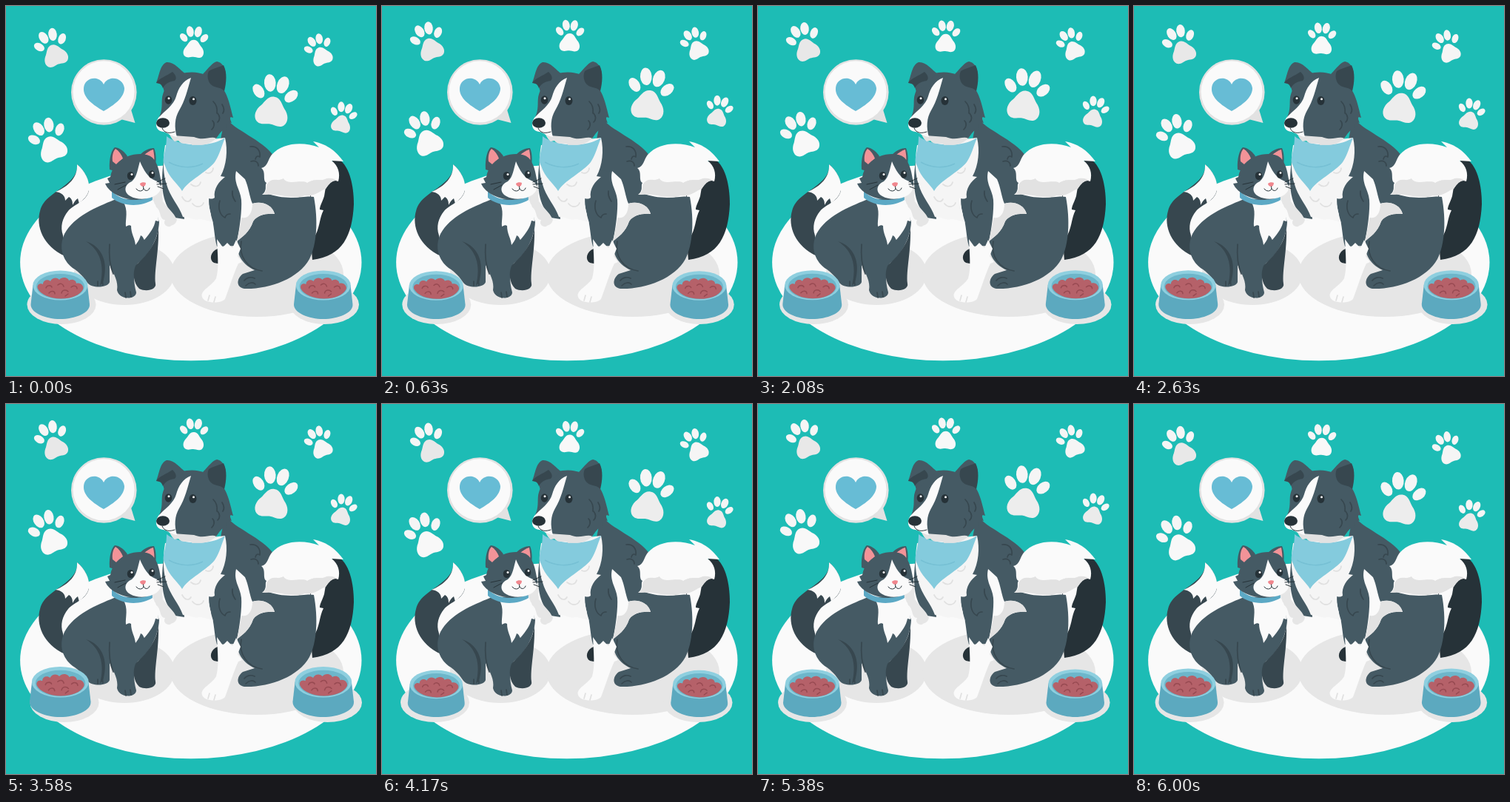
Recreate the animation shown at these times as an HTML page. Size 500 px wide and 500 px high, loop 6.04 s.

```html
<!DOCTYPE html>
<html lang="en">
<head>
<meta charset="utf-8">
<title>Cat and dog</title>
<style>
html, body { margin: 0; width: 100%; height: 100%; overflow: hidden; background: #1dbcb5; }
svg { display: block; width: 100%; height: 100%; }
.fur { fill: #455a64; }
.deep { fill: #37474f; }
.ink { fill: #263238; }
.white { fill: #fafafa; }
.soft { fill: #f5f5f5; }
.grey { fill: #e2e2e2; }
.shadow { fill: #e6e6e6; }
.line { fill: none; stroke: #37474f; stroke-width: 1.7; stroke-linecap: round; stroke-linejoin: round; }
.thin { stroke: #263238; stroke-width: 1; }
.pale { stroke: #e0e0e0; }
</style>
</head>
<body>
<svg viewBox="0 0 500 500">
<defs>
  <path id="pad" d="M0-21C9-21 12-12 16-7C23 0 25 10 19 16C13 21 6 17 0 17C-6 17-13 21-19 16C-25 10-23 0-16-7C-12-12-9-21 0-21Z"/>
  <g id="toes">
    <ellipse cy="-34" rx="7" ry="10.500" transform="rotate(-42)"/>
    <ellipse cy="-40" rx="8" ry="12" transform="rotate(-13)"/>
    <ellipse cy="-40" rx="8" ry="12" transform="rotate(13)"/>
    <ellipse cy="-34" rx="7" ry="10.500" transform="rotate(42)"/>
  </g>
  <g id="bowl">
    <path fill="#5ca9bf" d="M36.5 377L33.5 403C33 415 54 423 73 423C93 423 114 415 113 403L110 377Z"/>
    <ellipse cx="73.3" cy="377.500" rx="37" ry="20" fill="#8ecfdf"/>
    <ellipse cx="73.5" cy="379" rx="32.500" ry="17" fill="#6db6ca"/>
    <path fill="#b56169" d="M43 382C41 377 46 374 50 376C50 370 57 369 60 372C63 366 70 367 72 370C76 365 84 367 85 371C90 368 95 371 95 375C101 373 106 379 104 383C100 391 88 395.500 74 395.500C60 395.500 47 390 43 382Z"/>
    <path fill="none" stroke="#984a52" stroke-width="1.500" stroke-linecap="round" d="M54 381C55 377 61 377 62 380M70 377C73 374 77 375 78 379M58 388C61 384 66 385 66 389M75 388C76 383 82 383 84 386M88 380C91 377 96 378 96 382M80 392L84 389"/>
  </g>
</defs>

<ellipse cx="249.800" cy="346.500" rx="230.700" ry="132.700" class="white"/>
<ellipse cx="160" cy="361" rx="68" ry="43" class="shadow"/>
<ellipse cx="339" cy="362" rx="117" ry="58" class="shadow"/>

<!-- speech bubble -->
<path class="grey" d="M168 137L174.500 158L147 151Z"/>
<circle cx="132.300" cy="116.500" r="44.300" class="grey"/>
<circle cx="132" cy="115.800" r="41.500" class="white"/>
<path fill="#67bcd5" d="M132 142C118 134 104 124 105 111C106 96 126 93 132 106C138 93 158 96 160 111C160 124 146 134 132 142Z"/>

<g id="paws"></g>

<!-- dog: tail -->
<path class="ink" d="M446 205C464 213 470 242 470 268C468 310 455 338 414 343C411 310 410 280 412 235Z"/>
<path class="white" d="M411 245L432 245L430 257C428 264 424 270 424 275L429 276C423 288 424 302 416 313Z"/>

<!-- dog: body -->
<path class="fur" d="M296 150C308 168 346 180 362 203L350 252C380 265 405 255 416 258C422 290 420 322 410 342C395 369 355 383 322 382C311 380 311 369 320 362L336 357C317 348 309 332 314 312L276 290L290 180Z"/>
<path class="line" d="M330 190C340 189 344 196 343 204M343 204C340 202 338 203 337 207M331 210C337 208 341 211 341 216M318 318C314 338 326 355 346 358M322 371C326 366 332 366 336 368M324 378C329 373 334 373 337 376"/>
<path class="white" d="M359 201C374 184 402 183 423 191L415 183C436 187 447 198 456 210L440 209C449 216 452 226 449 237C443 234 438 238 432 247C425 249 418 258 404 256C388 263 370 252 346 255C354 249 349 243 352 239C346 236 352 224 345 219C354 217 354 207 359 201Z"/>
<path class="grey" d="M347 255C355 249 350 243 354 239C362 231 366 238 375 233C380 243 400 234 407 239C418 232 424 237 431 234C435 232 444 232 449 237C443 234 438 238 432 247C425 249 418 258 404 256C388 263 370 252 347 255Z"/>

<!-- dog: far leg and raised paw -->
<path class="ink" d="M286 328C276 332 274 343 281 347L296 350Z"/>
<path class="fur" d="M213 210C208 246 212 268 228 286L241 288L236 250Z"/>
<path fill="#e6e6e6" d="M209 233C213 241 210 252 212 264C219 274 226 278 231 289C229 297 224 295 222 298C216 299 212 294 215 289C207 289 210 276 203 272C202 266 196 265 196 260Z"/>

<!-- dog: chest and near leg -->
<path class="fur" d="M296 222C276 235 270 256 277 282C282 298 281 310 285 325L311 324C316 302 319 275 318 258L310 224Z"/>
<path class="white" d="M311 223L323 234C328 245 329 258 333 267C345 263 360 268 363 281C352 280 340 282 334 291C329 306 319 312 312 318C316 300 319 275 318 262C317 248 307 240 311 223Z"/>
<path class="grey" d="M333 267C345 263 360 268 363 281C352 280 340 282 334 291C329 306 319 312 312 318C315 304 318 292 318 286C326 288 333 282 333 267Z"/>
<path class="soft" d="M215 188C211 212 213 230 217 241C221 257 234 270 239 285C246 284 252 290 264 288C270 290 276 290 280 293C275 277 274 266 272 259C276 261 279 261 282 259C280 247 288 237 296 231L290 230C298 215 300 195 296 178Z"/>
<path class="line pale" d="M252 267C258 274 265 271 267 266M238 258C242 266 248 265 250 261M250 241C256 246 262 243 263 238M270 225C276 228 280 223 280 219"/>
<path class="line" d="M289 263C286 273 289 283 296 286C297 282 300 281 303 281M306 250C305 258 308 261 310 264"/>
<path class="white" d="M285 315C286 336 288 355 284 368C279 378 262 384 265 393C267 402 290 403 296 396C302 380 309 358 314 348L319 346L313 338L317 328L311 316L306 327L299 320L293 326Z"/>
<path class="line pale" d="M273 398L275 391M281 400L283 393"/>

<!-- dog: scarf -->
<path fill="#84cbdd" d="M217 176C217 198 209 206 215 216C220 232 232 240 238 250C246 236 272 224 282 211C289 200 291 190 296 178C275 192 235 190 217 176Z"/>
<path fill="none" stroke="#76c0d4" stroke-width="1.500" d="M220 211C234 219 252 220 266 213"/>

<!-- dog: head -->
<path class="grey" d="M216 168C222 172 222 179 228 183L233 182C238 189 247 183 252 188C262 187 272 191 285 178L260 160Z"/>
<path class="fur" d="M236 92C255 86 272 92 284 102C299 113 302 132 307 151C302 149 302 151 305 158C300 157 297 160 299 168C292 166 290 171 284 179C276 175 268 183 254 177L226 175L207 150C212 140 210 131 211 124C213 112 222 97 236 92Z"/>
<path class="fur" d="M211 106L203 104C207 95 208 79 217 76C227 75 235 86 243 92C232 98 222 110 214 116Z"/>
<path class="deep" d="M203 104C208 97 216 95 225 89C230 94 231 98 228 101C220 102 214 106 212 111C210 105 207 104 203 104Z"/>
<path class="fur" d="M266 92C274 84 279 76 285 75C292 76 296 83 297 92L294 118Z"/>
<path class="deep" d="M274 88C281 84 290 82 294 80C299 90 298 103 295 115C290 108 280 113 274 102C272 97 272 92 274 88Z"/>
<path class="white" d="M250 97C239 101 233 111 230 122C227 134 214 142 206 151C200 160 203 169 213 170C219 172 224 176 231 177C227 164 228 151 234 141C242 128 245 114 250 97Z"/>
<path class="line thin" d="M211 165C214 173 222 172 228 170"/>
<ellipse cx="212" cy="158" rx="9" ry="6.800" class="ink"/>
<path class="line" d="M280 129C285 134 286 139 285 145M286 145C290 150 289 154 286 157M279 155C283 159 281 164 278 167M292 133C295 138 295 142 293 145"/>
<g class="ink">
  <ellipse cx="219.500" cy="127" rx="4.800" ry="5.800"/>
  <ellipse cx="252.500" cy="128" rx="5" ry="6"/>
</g>
<g class="white">
  <circle cx="220" cy="124.800" r="1.500"/><circle cx="253.500" cy="125.800" r="1.500"/>
</g>

<!-- cat: tail -->
<path class="deep" d="M80 338C50 325 40 297 46 277C50 260 68 252 80 242C92 233 97 224 96 214C106 222 113 235 112 249C110 263 92 268 84 277C76 287 73 298 77 310Z"/>
<path class="white" d="M96 214C106 222 114 236 112 249C110 258 104 261 99 267L97 260C94 262 92 265 90 269C90 262 88 260 85 258L80 263C80 256 75 252 67 251C84 244 97 232 96 214Z"/>

<!-- cat: body -->
<path class="fur" d="M146 262C122 272 92 284 79 308C71 325 76 343 90 354C100 360 106 368 110 374C116 382 138 381 140 373L140 350C146 362 152 373 150 384C153 398 176 397 176 387C172 372 172 360 178 348C192 338 206 315 207 292L197 258Z"/>
<path class="deep" d="M206 300C203 322 190 337 175 351C171 361 172 374 180 382C190 387 204 383 202 375C200 358 207 330 206 300Z"/>
<path class="deep" d="M108 318C130 325 139 346 131 374L127 378C134 350 127 330 108 318Z"/>
<path class="line" d="M140 322C139 335 140 350 145 362M162 394L161 387M169 393L168 386M124 378L124 372M131 377L130 371"/>
<path class="white" d="M158 264C166 276 161 288 162 298C166 296 167 296 169 297C169 308 174 313 175 323C180 317 181 313 182 310C186 312 185 314 187 316C195 306 200 300 202 290L206 291C206 280 202 270 198 260Z"/>
<path fill="#5ca9c5" d="M143 250C155 264 180 266 197 255L198 262C180 273 155 270 143 259Z"/>

<!-- cat: head -->
<path class="fur" d="M140 221C139 205 143 194 147 191C155 192 161 198 164 203L150 224ZM181 201C187 195 194 192 200 192C203 199 203 208 202 216Z"/>
<path fill="#f29398" d="M144 210C143 202 145 196 148 193C153 196 156 201 158 206L149 214ZM186 202C190 198 195 195 199 194C200 200 201 205 200 210Z"/>
<path class="fur" d="M150 213C162 199 188 196 198 205C205 213 207 222 209 234C214 246 200 258 187 261C165 264 141 256 134 240L140 239L137 233L141 231C142 224 145 218 150 213Z"/>
<path class="white" d="M181 210C178 220 177 231 170 237C159 242 159 252 168 257C180 264 201 261 208 250C211 242 207 238 202 236C192 232 186 222 181 210Z"/>
<g class="ink">
  <ellipse cx="168.500" cy="229.500" rx="4.700" ry="5.500"/>
  <ellipse cx="197" cy="227.500" rx="4.200" ry="5.300"/>
</g>
<g class="white">
  <circle cx="170" cy="227.500" r="1.500"/><circle cx="198" cy="225.500" r="1.400"/>
</g>
<path fill="#f0868d" d="M181 240C183 238 187 238 189 239C189 242 187 244 185.500 244C183 244 181 242 181 240Z"/>
<path class="line thin" d="M185.500 244L186 247C184 251 179 251 176 247M186 247C188 251 193 250 194 246M147 241L161 238M151 248L162 242M204 238L215 233M204 241L217 240M205 244L213 247"/>

<g id="bowls"></g>
</svg>
<script>
const LOOP = 6040, TAU = 2 * Math.PI;
const get = id => document.getElementById(id);

// x, y, scale, tilt, pad colour
const paws = [
  [66.500, 67, .72, -20, "#e8e8e8"],
  [253.500, 58.500, .61, 2, "#f8f8f8"],
  [427, 68, .6, -22, "#f5f5f5"],
  [359.500, 143, .98, 9, "#ededed"],
  [453, 159.500, .58, 13, "#ebebeb"],
  [63, 193, .82, -22, "#f8f8f8"]
];
get("paws").innerHTML = paws.map(([x, y, s, tilt, pad]) =>
  `<g transform="translate(${x} ${y}) rotate(${tilt}) scale(${s})">
    <use href="#pad" fill="${pad}"/><use href="#toes" class="soft"/></g>`).join("");

get("bowls").innerHTML = [0, 355.500].map(x =>
  `<g transform="translate(${x})"><ellipse class="shade shadow" cx="75" cy="403.500" rx="46.500" ry="26.500"/>
    <use class="dish" href="#bowl"/></g>`).join("");
const shades = document.querySelectorAll(".shade");
const dishes = document.querySelectorAll(".dish");

function draw(now) {
  const p = now % LOOP / LOOP;
  const lift = 4.6 * (1 - Math.cos(4 * TAU * p));
  get("paws").setAttribute("transform", `translate(0 ${-lift})`);
  // the wobble swells toward the middle of the loop
  const sway = Math.sin(Math.PI * p) * Math.cos(TAU * (5 * p + .05));
  shades.forEach(s => s.setAttribute("transform", `translate(${4.2 * sway})`));
  dishes.forEach(d => d.setAttribute("transform",
    `translate(73.3 423) scale(${1 + .04 * sway}) translate(-73.3 -423)`));
  requestAnimationFrame(draw);
}
requestAnimationFrame(draw);
</script>
</body>
</html>
```
